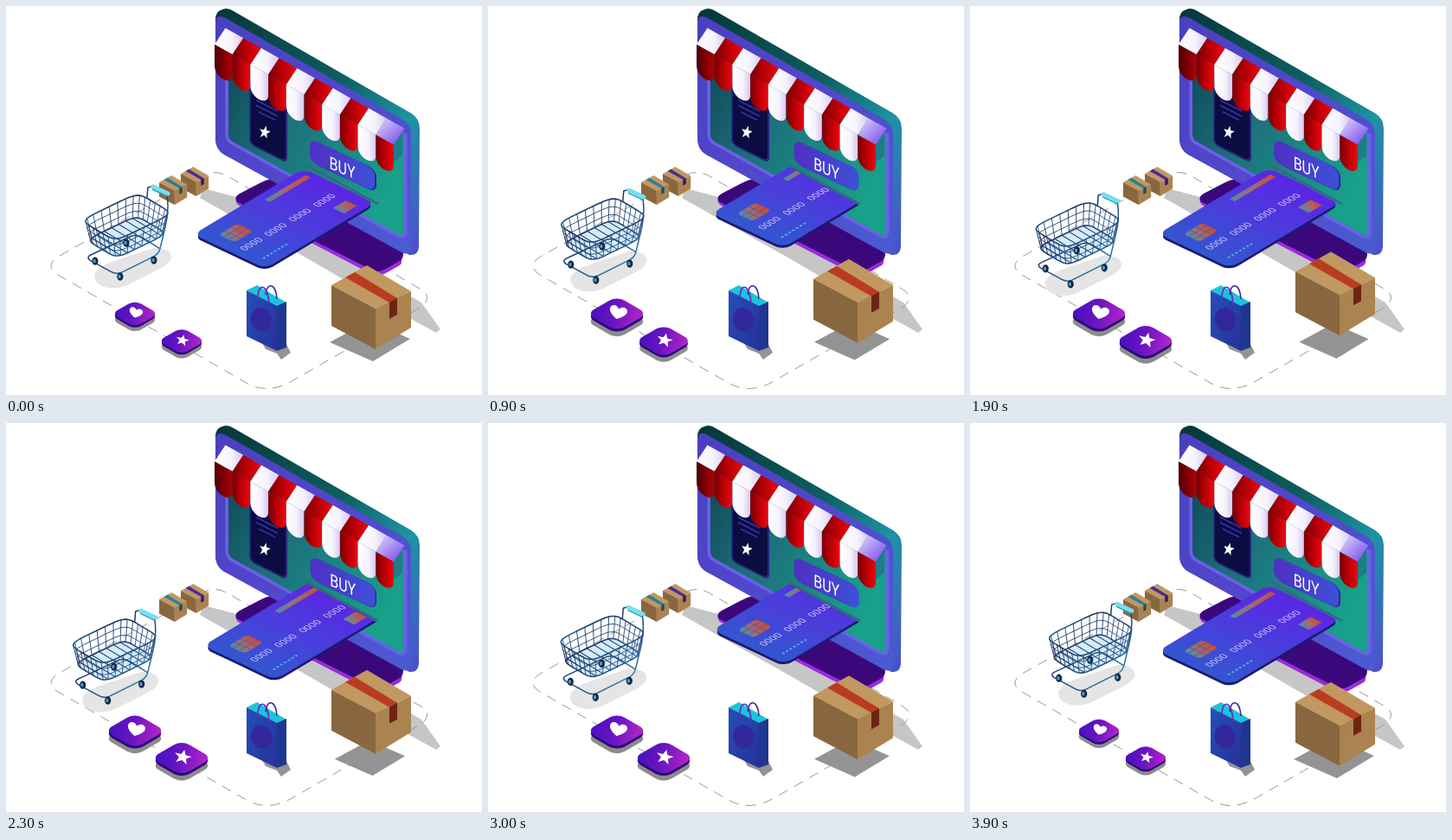
Write an HTML page that moves like this. It is 550x450 px and loops after 4 s.

```html
<!DOCTYPE html>
<html lang="en">
<head>
<meta charset="utf-8">
<title>Online shop</title>
<style>
html, body { margin: 0; width: 100%; height: 100%; overflow: hidden; background: #fff; }
svg { display: block; width: 550px; height: 450px; }
text { font-family: Roboto, Arial, sans-serif; }
</style>
</head>
<body>
<svg viewBox="0 0 550 450">
<defs>
  <linearGradient id="rim" x2="1" y2="1"><stop stop-color="#06363a"/><stop offset=".45" stop-color="#0d5f60"/><stop offset=".7" stop-color="#1c94a4"/><stop offset="1" stop-color="#4f4cd0"/></linearGradient>
  <linearGradient id="bezel" x2="1" y2="1"><stop stop-color="#4a3fc0"/><stop offset=".5" stop-color="#5148cc"/><stop offset="1" stop-color="#4a5cd0"/></linearGradient>
  <linearGradient id="screen" x2="1" y2=".6"><stop stop-color="#0d4653"/><stop offset=".4" stop-color="#1d6d7b"/><stop offset="1" stop-color="#18a08a"/></linearGradient>
  <linearGradient id="red"><stop stop-color="#7a0004"/><stop offset=".55" stop-color="#c00006"/><stop offset="1" stop-color="#e80a10"/></linearGradient>
  <linearGradient id="darkRed"><stop stop-color="#4c0004"/><stop offset="1" stop-color="#b00006"/></linearGradient>
  <linearGradient id="white"><stop stop-color="#fff"/><stop offset=".6" stop-color="#f6f2fc"/><stop offset="1" stop-color="#d4c8f2"/></linearGradient>
  <linearGradient id="lilac" x2="1" y2="1"><stop stop-color="#e4dcff"/><stop offset="1" stop-color="#7040e8"/></linearGradient>
  <linearGradient id="button"><stop stop-color="#4f2fc4"/><stop offset="1" stop-color="#3d51d6"/></linearGradient>
  <linearGradient id="card"><stop stop-color="#3356d0"/><stop offset=".5" stop-color="#4a3ddc"/><stop offset="1" stop-color="#5b25e4"/></linearGradient>
  <linearGradient id="foil" x2="1" y2=".3"><stop stop-color="#3f93a8"/><stop offset=".5" stop-color="#96707a"/><stop offset="1" stop-color="#c4503e"/></linearGradient>
  <linearGradient id="tile" y1="1" x2="1" y2=".2"><stop stop-color="#4410c0"/><stop offset=".5" stop-color="#6614c2"/><stop offset="1" stop-color="#b424c8"/></linearGradient>
  <linearGradient id="bag" x2="1" y2="1"><stop stop-color="#2450b8"/><stop offset="1" stop-color="#27309a"/></linearGradient>
  <linearGradient id="metal" gradientUnits="userSpaceOnUse" x1="90" y1="215" x2="180" y2="310"><stop stop-color="#22a8cc"/><stop offset=".3" stop-color="#1f3460"/><stop offset=".7" stop-color="#2a5688"/><stop offset="1" stop-color="#28a6cc"/></linearGradient>
  <clipPath id="slot"><path d="M200,106L440,236.5V330H200Z"/></clipPath>
  <path id="star" d="M0-8L2.1-2.6 8-2.5 3.4,1.2 5,7 0,3.6-5,7-3.4,1.2-8-2.5-2.1-2.6Z"/>
  <path id="heart" d="M0,7C-5,4-9,0-8-4C-7-8-2-8,0-4C2-8,7-8,8-4C9,0,5,4,0,7Z"/>
  <rect id="plate" x="-20" y="-20" width="40" height="40" rx="10" transform="matrix(.707,.408,-.707,.408,0,0)"/>
  <g id="carton">
    <path fill="#c1985f" d="M0,23L41,0 92,30 51,50Z"/>
    <path fill="#886740" d="M0,23L51,50V97L0,70Z"/>
    <path fill="#aa8350" d="M51,50L92,30V72L51,97Z"/>
    <path fill="currentColor" d="M16,14L27,8 76,38V57L67,62V43Z"/>
    <path fill="#000" opacity=".4" d="M67,43L76,38V57L67,62Z"/>
  </g>
</defs>

<path fill="#c6c6c6" d="M228,211L270,222 480,343 502,374 497,378 470,363 350,293 224,222Z"/>
<path id="track" pathLength="950" fill="none" stroke="#999" stroke-dasharray="11 8"
  d="M62,289L228,196Q242,188 258,198L478,327Q494,336 480,348L332,433Q302,451 276,435L60,311Q43,300 62,289Z"/>

<path fill="#9a2cdc" d="M268,230Q262,224 270,219L293,207Q300,203 307,203L452,285Q461,294 455,300L437,310Q430,314 422,310Z"/>
<path fill="#3b087c" d="M268,227Q262,222 270,217L293,205Q300,201 307,200L458,281Q461,291 455,295L437,305Q430,309 422,305Z"/>

<g id="monitor">
  <path fill="url(#rim)" d="M250,4Q256,1 263,6L468,124Q478,130 478,142L477,279Q476,289 466,288L250,170Q242,165 242,152V16Q242,6 250,4Z"/>
  <path fill="url(#bezel)" d="M242,20Q242,8 254,14L458,131Q468,137 468,148V277Q468,290 457,285L252,172Q242,166 242,153Z"/>
  <path fill="url(#screen)" stroke="#6c60ea" stroke-width="7" paint-order="stroke" d="M257,42V149Q257,154 262,157L455,265Q460,267 460,261V150Z"/>
  <g transform="matrix(1,.5,0,1,281,84)">
    <rect width="44" height="76" rx="6" fill="#25267c"/>
    <rect x="2" y="1" width="40" height="73" rx="5" fill="#0b0c42"/>
    <path stroke="#4038b4" stroke-width="1.5" d="M8,21H33M8,27H33M11,33H30"/>
  </g>
  <use href="#star" fill="#fff" transform="translate(299 146) rotate(12) scale(.8 .95)"/>
  <path stroke="#3d5f86" stroke-width="2" d="M347,184L430,229"/>
</g>
<g id="awning"></g>

<g transform="matrix(1,.47,0,1,354,154.5)"><rect width="74" height="27" rx="9" fill="#2b2394"/></g>
<g id="buy">
  <g transform="matrix(1,.47,0,1,351,153)"><rect width="75" height="27" rx="9" fill="url(#button)"/></g>
  <text transform="matrix(.8,.34,0,1,388.5,194)" font-size="20" fill="#fff" text-anchor="middle">BUY</text>
</g>

<g clip-path="url(#slot)"><g id="pay">
  <g transform="matrix(1.477,-.885,1.537,.732,216,267.5)"><rect width="86" height="54" rx="6" fill="#1a1a70"/></g>
  <g id="face" transform="matrix(1.477,-.885,1.537,.732,216,264.5)">
    <rect width="86" height="54" rx="6" fill="url(#card)"/>
    <rect x="8.5" y="10.7" width="14.5" height="12" rx="2.5" fill="url(#foil)"/>
    <path stroke="#6d4a86" stroke-width=".4" d="M8.5,14.5H23M8.5,18.7H23M13.5,10.7V22.7M18,10.7V22.7"/>
    <rect x="50" y="5.5" width="32" height="3.8" fill="url(#foil)"/>
    <rect x="67.5" y="40" width="10" height="8.5" fill="url(#foil)"/>
    <path stroke="#46b8e8" stroke-width="1.4" stroke-dasharray="1.5 1.4" d="M6.7,46H25.5"/>
  </g>
</g></g>

<path id="boxShadow" fill="#949494" d="M374,389L420,364 467,385 424,411Z"/>
<g id="box" color="#ba3c20"><use href="#carton" x="376" y="300"/></g>
<g color="#4a2a9c"><use href="#carton" transform="translate(202 186) scale(.35)"/></g>
<g color="#2a7f9e"><use href="#carton" transform="translate(177 196) scale(.35)"/></g>

<g>
  <path fill="#949494" d="M296,390L324,391 329,401 318,409 313,402 300,397Z"/>
  <path fill="#1bc4d8" d="M278,329L290,323 324,343 313,348Z"/>
  <path fill="none" stroke="#3c2aa8" stroke-width="1.5" d="M300,334C301,319 312,320 313,339"/>
  <path fill="url(#bag)" d="M278,329L313,347V399L278,382Z"/>
  <path fill="#1f3790" d="M313,347L324,342V395L313,399Z"/>
  <ellipse cx="295" cy="363" rx="12" ry="14" fill="#32289c" transform="rotate(-15 295 363)"/>
  <path fill="none" stroke="#6a28c4" stroke-width="1.7" d="M291,340C290,321 302,318 304,345"/>
</g>

<g id="heartTile"></g>
<g id="starTile"></g>

<g id="cart">
  <path fill="#e5e5e5" d="M103,309Q108,301 122,296L170,280Q190,279 191,291Q189,299 174,306L140,323Q120,331 106,321Q101,315 103,309Z"/>
  <g id="wire" fill="none" stroke="url(#metal)" stroke-linecap="round" stroke-linejoin="round"></g>
  <g id="wheels"></g>
  <path stroke="#7cdcf0" stroke-width="5" stroke-linecap="round" d="M170,209L187,217"/>
  <path stroke="#22a6c4" stroke-width="1.5" d="M169,212L186,220"/>
</g>
</svg>

<script>
const $ = id => document.getElementById(id);
const path = (d, attrs) => `<path d="${d}" ${attrs}/>`;

// Awning: each stripe is a roof strip plus a hanging scallop
const STRIPE = 20.7, DROP = 11.6;
let awning = path('M448,160L458,140V173L448,181Z', 'fill="#1f7c88"');
for (let i = 0; i < 10; i++) {
  const x = 241 + i * STRIPE, y = 44.5 + i * DROP, isRed = i % 2;
  const roof = i === 9 ? 'lilac' : isRed ? 'red' : 'white';
  const flap = i === 0 ? 'darkRed' : isRed ? 'red' : 'white';
  awning += path(`M${x},${y}l12.5,-19l${STRIPE},${DROP}l-12.5,19Z`, `fill="url(#${roof})"`)
    + path(`M${x},${y}l${STRIPE},${DROP}v24c0,13 -${STRIPE},4 -${STRIPE},-11Z`, `fill="url(#${flap})"`);
}
$('awning').innerHTML = awning;

for (let i = 0; i < 4; i++)
  $('face').innerHTML += `<text x="${5.8 + i * 19}" y="33.3" font-size="6.5" fill="#cfc4f4">0000</text>`;

const tile = icon => `<use href="#plate" y="7" fill="#8c8c8c"/><use href="#plate" y="2.5" fill="#2a0a78"/>
  <use href="#plate" fill="url(#tile)"/><use href="#${icon}" fill="#fff" transform="translate(1 -1) rotate(14) scale(1 .85)"/>`;
$('heartTile').innerHTML = tile('heart');
$('starTile').innerHTML = tile('star');

// Cart basket: rounded iso square, s = 0..4 around it, depth h from 0 (top) to 1 (bottom)
const side = s => Math.max(-1, Math.min(1, 2 - 2 * Math.abs((s % 4 + 4) % 4 - 2)));
function rim(s, h) {
  const x = side(s), y = side(s - 1);
  const k = (1 - .12 * h) / (x ** 6 + y ** 6) ** (1 / 6), u = x * k, v = y * k;
  return [139.5 + 33 * u + 20 * v, 244 - 16 * u + 12 * v + 23 * h].map(n => n.toFixed(1));
}
const ring = h => 'M' + Array.from({length: 64}, (_, i) => rim(i / 16, h)).join('L') + 'Z';
let bars = '';
for (let i = 0; i < 28; i++) {
  const s = i / 7;
  bars += `M${rim(s, 0)}L${rim(s, 1)}`;
  if (Math.abs(side(s - 1)) === 1) bars += `M${rim(s, 1)}L${rim(4 - s, 1)}`;
}
$('wire').innerHTML = path(ring(1), 'fill="#58aee0" fill-opacity=".25" stroke="none"')
  + path(bars + ring(.35) + ring(.7), 'stroke-width=".9"')
  + path(ring(0) + ring(1), 'stroke-width="1.6"')
  + path('M164,210L171,208M164,210L163,222M186,218Q189,236 184,256L178,281Q176,288 168,291L134,308Q127,311 121,307L97,294Q92,290 100,287L145,266Q152,264 158,268L177,280', 'stroke-width="1.5"');
$('wheels').innerHTML = [[103, 295], [132, 313], [171, 294], [139, 274]].map(([x, y]) =>
  `<ellipse cx="${x}" cy="${y}" rx="3.6" ry="4.6" fill="#162548"/><ellipse cx="${x - .8}" cy="${y}" rx="1.6" ry="2.3" fill="#38a6cc"/>`).join('');

const LOOP = 4000;
const clamp = v => Math.min(1, Math.max(0, v));
const ease = v => (v = clamp(v), v * v * (3 - 2 * v));
// There-and-back swing between 0 and 1
function swing(t, period) {
  const p = t / period % 1;
  return .4 * (1 - Math.abs(2 * p - 1)) + .3 * (1 - Math.cos(2 * Math.PI * p));
}
const grow = (t, inAt, outAt) => .96 + .29 * (ease((t - inAt) / 650) - ease((t - outAt) / 600));
const move = (id, x, y, scale = 1) => $(id).setAttribute('transform', `translate(${x} ${y}) scale(${scale})`);

function draw(now) {
  const t = now % LOOP;
  const slow = swing(t + 25, LOOP), fast = swing(t + 25, LOOP / 2);
  move('cart', -16 * slow, 9 * slow);
  move('box', 0, -16 * slow);
  const s = 1 - .14 * slow;
  move('boxShadow', 420 * (1 - s), 387 * (1 - s), s);
  move('pay', 44 * fast, -25.5 * fast);
  move('buy', 2.7 * fast, 1.2 * fast);
  move('heartTile', 149, 356, grow(t, 50, 3250));
  move('starTile', 203, 387.5, grow(t, 500, 3050));
  $('track').setAttribute('stroke-dashoffset', -38 * t / LOOP);
  requestAnimationFrame(draw);
}
requestAnimationFrame(draw);
</script>
</body>
</html>
```
